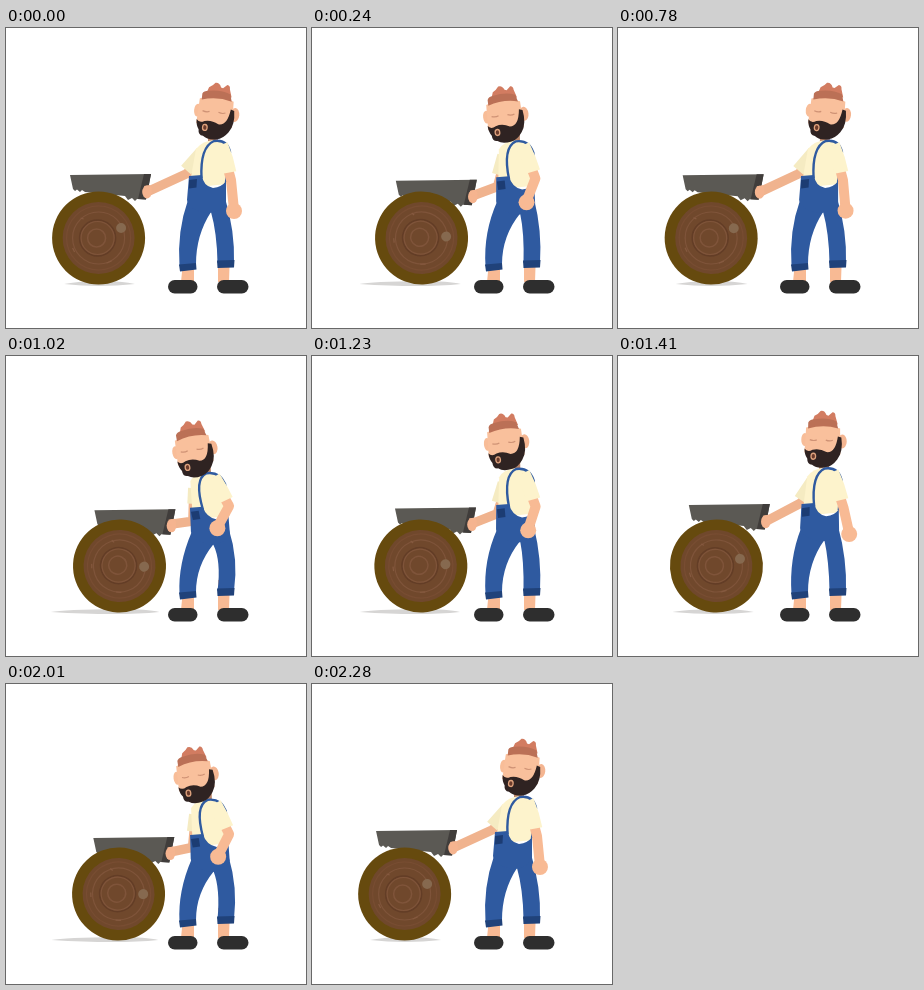
These frames come from a looping animation (300 px wide and 300 px high, 2.31 s). An HTML page:

```html
<!DOCTYPE html>
<html lang="en">
<head>
<meta charset="utf-8">
<title>Sawing a log</title>
<style>
html, body { margin: 0; width: 100%; height: 100%; overflow: hidden; background: #fff; }
svg { display: block; width: 100vw; height: 100vh; }
</style>
</head>
<body>
<svg viewBox="0 0 300 300">
  <path id="shadow" fill="#d6d5d4"/>

  <g id="saw">
    <path fill="#5b5954" d="M64 147 L145 146 L140 171.5 L131 171 L129 173 L126 170 L122 172 L119 168 L79 164 L76 162 L74 164 L71 161.500 L69 163 L67 161 Z"/>
    <path fill="#403d3b" d="M138 146 L145 146 L140 171.500 L132 171 Z"/>
  </g>

  <g id="log">
    <circle r="46.500" fill="#664a0e"/>
    <circle r="36" fill="#70482c"/>
    <g fill="none" stroke="#7f543a" stroke-width="1.200">
      <circle r="32" stroke="#784d32"/>
      <circle r="26"/>
      <circle cx="-1" r="18" stroke="#633d26" stroke-width="1.500"/>
      <circle cx="-1" r="16.500"/>
      <circle cx="-2" r="9" stroke-width="1.500"/>
    </g>
    <path d="M-18 -20 l3 1 M-26 10 l2 4 M8 25 l5 -2" stroke="#85593f" stroke-width="1.200"/>
    <circle cx="22.500" cy="-10" r="5" fill="#86694f"/>
  </g>

  <path fill="#f8ba94" d="M178 224 h10 v30 h-13 z M212 224 h12 l-1 30 h-11 z"/>
  <g fill="#2e2e2e">
    <rect x="162" y="252" width="29.500" height="13.500" rx="6.700"/>
    <rect x="211" y="252" width="31.500" height="13.500" rx="6.700"/>
  </g>
  <path id="legs" fill="#2f5aa0"/>
  <path fill="#20427a" d="M173 236.500 L190 235 L190.500 241.500 L174 243.500 Z M211 232.500 L228.500 232 L228 239.500 L211.500 240 Z"/>

  <path id="foreArm" fill="none" stroke="#f0b38e" stroke-width="9.500" stroke-linecap="round" stroke-linejoin="round"/>
  <path id="foreSleeve" fill="none" stroke="#f5ebc2" stroke-width="13"/>
  <path id="neck" stroke="#b98468" stroke-width="10"/>
  <path id="shirt" fill="#fdf3cc"/>
  <path id="bib" fill="#2f5aa0"/>
  <path id="strap" fill="none" stroke="#2f5aa0" stroke-width="2.400"/>
  <path id="pocket" fill="#1c3c73"/>

  <path id="backArm" fill="none" stroke="#f8ba94" stroke-width="10" stroke-linecap="round" stroke-linejoin="round"/>
  <circle id="backHand" r="8" fill="#f8ba94"/>
  <path id="backSleeve" fill="none" stroke="#fdf3cc" stroke-width="14"/>

  <g id="grip" fill="#f5b48f">
    <ellipse cx="141" cy="164" rx="4.800" ry="6.500"/>
    <path d="M138 158 l6 -1 l2 4 l-6 3 z"/>
  </g>

  <g id="head">
    <ellipse cx="19.500" cy="1" rx="4.500" ry="7" fill="#f4b591"/>
    <ellipse cx="-18" cy="0" rx="3.500" ry="6.500" fill="#f8bd98"/>
    <path fill="#f9c09c" d="M-17 -12 Q0 -18 17 -12 L18 14 Q1 22 -18 13 Z"/>
    <path fill="#2f2322" d="M-18 9 Q-15 13 -10 10 Q-3 8 4 12 Q13 13 15 -4 L18.500 -3 Q21 11 15 19 Q10 26 4 27 Q-5 29 -10 25 Q-15 25 -15 19 Q-18 15 -18 9 Z"/>
    <ellipse cx="-9" cy="16.500" rx="2.300" ry="3" fill="#6b3b2b" stroke="#dea27d" stroke-width="1.300"/>
    <path d="M-13 0 q4 1.500 7 0 M3 0 q4 1.500 7 0" fill="none" stroke="#cf9275" stroke-width="1.200"/>
    <path fill="#d27c61" d="M-11 -18 L-9 -24 Q-5 -26 -3 -29 Q1 -30 3 -25 L5 -24.500 L9 -28 Q12 -28 12 -24 L14.500 -16 Z"/>
    <path fill="#bb7056" d="M-15 -17 Q-14 -20 -9 -20.500 Q4 -23 13 -19 L15 -12 Q0 -16 -15 -11 Z"/>
  </g>
</svg>
<script>
const LOOP = 2310;
// Turning points of the strokes: time, position.
const TURNS = [[0, 0], [345, 1], [750, 0], [1050, 1], [1605, 0], [1955, 1], [2290, 0], [2310, 0]];
const el = id => document.getElementById(id);
const mix = (a, b, k) => a + (b - a) * k;
const draw = (id, d) => el(id).setAttribute('d', d);
const place = (id, x, y, r = 0) =>
  el(id).setAttribute('transform', `translate(${x} ${y}) rotate(${r})`);

function stroke(t) {
  const i = TURNS.findIndex(k => k[0] > t);
  const [t0, a] = TURNS[i - 1], [t1, b] = TURNS[i];
  return mix(a, b, (1 - Math.cos(Math.PI * (t - t0) / (t1 - t0))) / 2);
}

// The free arm swings wide once, on the slow return.
function swing(t) {
  const u = (t - 1180) / 420;
  return u > 0 && u < 1 ? Math.sin(Math.PI * u) ** 2 : 0;
}

function render(t) {
  const p = stroke(t), drop = p ** 5.5, wide = swing(t);
  const logX = mix(92.6, 114, p);

  const l = mix(58, 44.5, p), r = mix(129, 154, p);
  draw('shadow', `M${l} 256 Q${l + 12} 253.500 ${logX} 253 Q${r - 12} 253 ${r} 256 Q${logX} 260 ${l} 256 Z`);
  place('log', logX, 210, 26 * p);
  place('saw', 25 * p, 7.4 * p);
  place('grip', 25 * p, 6 * p);

  // Chest leans left and sinks at the end of the pull; hips slide right.
  const sx = -4 * p - 4 * drop, sy = -2 * p + 7 * drop;
  const hx = 4 * p, hy = p + 3 * drop;
  const q = (x, y) => {
    const k = Math.min(1, Math.max(0, (160 - y) / 46));
    return `${x + mix(hx, sx, k)} ${y + mix(hy, sy, k)}`;
  };

  const crotch = `${205 + 5 * p - 3 * drop} ${184 + 5 * drop}`;
  draw('legs', `M${q(182, 172)} Q${171 + drop} ${203 + 6 * drop} 173.500 238 L190 236 Q190 ${207 + 3 * drop} ${crotch} Q${211 + 5 * drop} 205 211.500 235 L228 235 Q${229 + 4 * drop} 203 ${q(219, 170)} Z`);
  draw('neck', `M${q(207, 116)} L${q(207, 102)}`);
  draw('shirt', `M${q(190, 121)} Q${q(196, 113)} ${q(208, 112)} Q${q(220, 112)} ${q(222, 124)} L${q(221, 156)} L${q(183, 160)} Z`);
  draw('bib', `M${q(183, 148)} L${q(196, 147)} Q${q(197, 158)} ${q(207, 160)} Q${q(216, 159)} ${q(220, 153)} L${q(220, 174)} Q${q(214, 186)} ${q(200, 185)} Q${q(183, 182)} ${q(181, 172)} Z`);
  draw('strap', `M${q(195.5, 150)} Q${q(194, 119)} ${q(208, 113)} Q${q(221, 111)} ${q(224, 124)} L${q(220, 154)}`);
  draw('pocket', `M${q(183, 152)} L${q(191, 151)} L${q(190.5, 159.5)} L${q(183, 160.5)} Z`);

  const gx = 143 + 25 * p, gy = 163 + 5 * p;
  const ax = 191 + sx, ay = 128 + sy + 4 * p;
  const ex = mix(180, 187, p), ey = 146 + 20 * p * p;
  draw('foreArm', `M${gx} ${gy} L${ex} ${ey} L${ax + 4} ${ay + 8}`);
  draw('foreSleeve', `M${mix(180, 188, p)} ${mix(142, 148, p)} L${ax + 5} ${ay - 4}`);

  const bx = 217 + sx, by = 122 + sy;
  const jx = mix(225, 223, p) + wide, jy = mix(152, 150, p);
  const wx = mix(228, 211, p) + 8 * wide, wy = mix(183, 172, p) - 2 * wide;
  draw('backArm', `M${bx} ${by} L${jx} ${jy} L${wx} ${wy - 1}`);
  place('backHand', wx, wy);
  draw('backSleeve', `M${bx - 2} ${by - 5} Q${mix(bx, jx, 0.35) + 1} ${mix(by, jy, 0.3)} ${mix(bx, jx, 0.8)} ${mix(by, jy, 0.75)}`);

  place('head', 209.5 - 22.5 * p ** 1.2, 84 + 11 * drop, 6 - 16 * p);
}

function tick() {
  render(performance.now() % LOOP);
  requestAnimationFrame(tick);
}
tick();
</script>
</body>
</html>
```
